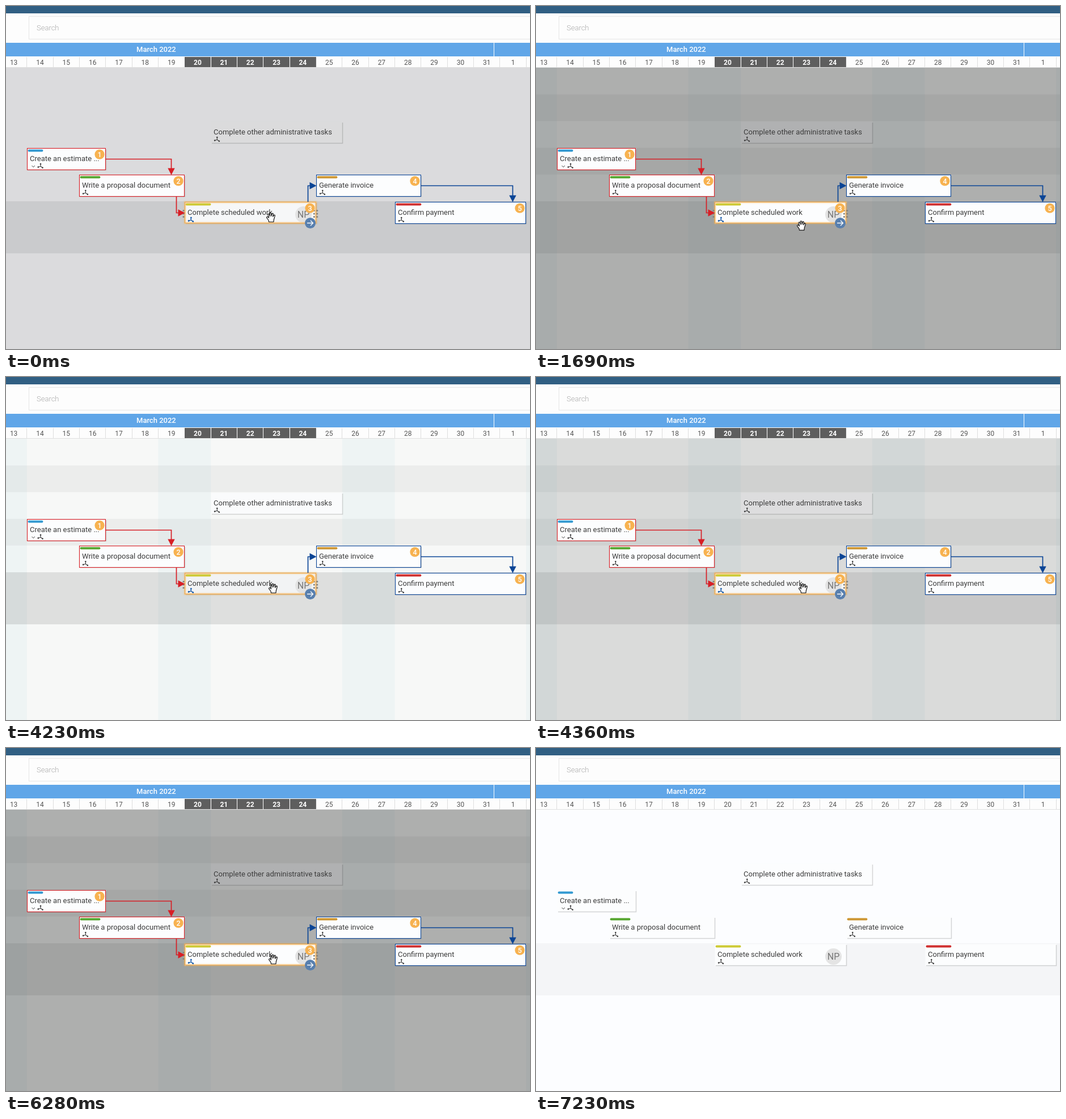
An HTML page for the animation above (7.73 s loop, 924 by 606 pixels).

```html
<!DOCTYPE html>
<html lang="en">
<head>
<meta charset="utf-8">
<style>
  html, body { margin: 0; width: 100%; height: 100%; overflow: hidden; background: #fcfdff; }
  svg { display: block; width: 924px; height: 606px; font: 13px Roboto, sans-serif; }
</style>
</head>
<body>
<svg id="stage" viewBox="0 0 924 606"></svg>
<script>
const LOOP = 7730, DAY = 46.34, ROW = 47.2;
const RED = '#d71f26', BLUE = '#0b4596', ORANGE = '#f7b250', INK = '#3c3c3c';
const dayX = i => 36.8 + DAY * i;

const rect = (x, y, w, h, fill, extra = '') =>
  `<rect x="${x}" y="${y}" width="${w}" height="${h}" fill="${fill}" ${extra}/>`;
const line = (d, color, width = 1, extra = '') =>
  `<path d="${d}" fill="none" stroke="${color}" stroke-width="${width}" ${extra}/>`;
const text = (x, y, str, fill, extra = '') => `<text x="${x}" y="${y}" fill="${fill}" ${extra}>${str}</text>`;
const circle = (x, y, r, fill) => `<circle cx="${x}" cy="${y}" r="${r}" fill="${fill}"/>`;
const group = (id, content) => `<g id="${id}">${content}</g>`;

// Cards are placed by first day, length in days and row.
function card(day, length, row, label, color, edge) {
  const x = Math.round(dayX(day)), right = Math.round(dayX(day + length)), y = Math.round(204 + ROW * row);
  return { x, right, y, w: right - x, mid: y + 19.5, bar: color ? 9 * length - 1 : 0, label, color, edge };
}
const other = card(7, 5, 0, 'Complete other administrative tasks');
const cards = [
  card(0, 3, 1, 'Create an estimate ...', '#3399d1', RED),
  card(2, 4, 2, 'Write a proposal document', '#55a52e', RED),
  card(6, 5, 3, 'Complete scheduled work', '#cdca35'),
  card(11, 4, 2, 'Generate invoice', '#cd9632', BLUE),
  card(14, 5, 3, 'Confirm payment', '#d03030', BLUE)
];
const [estimate, proposal, active, invoice, payment] = cards;

const outline = (c, color, width, extra) =>
  rect(c.x + .5, c.y + .5, c.w - 1, c === active ? 37 : 38, 'none', `stroke="${color}" stroke-width="${width}" ${extra}`);

const cardBody = c => rect(c.x + .5, c.y + .5, c.w, 38, '#fcfdfe') +
  line(`M${c.x + 2} ${c.y + 38.5}H${c.right + .5}V${c.y + 2}`, '#000', 1.5, 'opacity=".16"');

function nodeIcon(x, y, color) {
  const tips = [0, 1, 2].map(i => [x + 4.4 * Math.sin(i * 2.2), y - 4.2 * Math.cos(i * 2.2)]);
  return tips.map(([tx, ty]) => line(`M${x} ${y}L${tx} ${ty}`, color, 1.1) + circle(tx, ty, 1.3, color)).join('');
}

function cardLabel(c) {
  const collapsed = c === estimate;
  return (c.bar ? line(`M${c.x + 3.5} ${c.y + 4.5}h${c.bar - 3}`, c.color, 3.8, 'stroke-linecap="round"') : '') +
    text(c.x + 5, c.y + 23, c.label, INK) + nodeIcon(c.x + (collapsed ? 24 : 11.3), c.y + 32.3, INK) +
    (collapsed ? line(`M${c.x + 8.5} ${c.y + 31}l2.7 2.7 2.7-2.7`, INK) : '');
}

function days(from, to, dark) {
  let out = '';
  for (let i = from; i <= to; i++) {
    const x = Math.floor(dayX(i)) + .5;
    if (dark) out += rect(x, 90, DAY, 18, '#5e5e5e');
    out += line(`M${x} 90V108`, dark ? '#fff' : '#dedede') +
      text(dayX(i) + DAY / 2, 104, i < 18 ? i + 14 : 1, dark ? '#fff' : '#555',
        `text-anchor="middle" font-size="12" ${dark ? 'font-weight="700"' : ''}`);
  }
  return out;
}

const header =
  rect(0, 0, 924, 109, '#fdfdfd') + rect(0, 0, 924, 13, '#315f83') +
  rect(40.5, 18.5, 900, 40, '#fdfdfd', 'stroke="#e6e6e6"') +
  text(54, 43, 'Search', '#a9a9a9', 'font-weight="300"') +
  rect(0, 65, 924, 24, '#60a6e8') + line('M860.5 65V89', '#fff') +
  text(230, 81, 'March 2022', '#fff', 'font-weight="500"') +
  days(-1, 19) + line('M0 108.5H924', '#e0e0e0');

const stripes = rect(0, 109, 924, 497, '#f9f8f6', 'opacity=".6"') +
  [1, 3].map(i => rect(0, 109 + ROW * i, 924, ROW, '#000', 'opacity=".042"')).join('') +
  [-2, 5, 12, 19].map(i => rect(dayX(i), 109, 2 * DAY, 497, '#9fcdd8', 'opacity=".1"')).join('');

const down = (x, y) => `M${x - 6.2} ${y - 12}h12.4L${x} ${y}z`;
const ahead = (x, y) => `M${x - 12} ${y - 6.2}v12.4L${x} ${y}z`;
const arrow = (path, head, color) => line(path, color, 1.7) + `<path d="${head}" fill="${color}"/>`;

// From a card's side down onto the next card's top.
function linkOver(a, b, color) {
  const x = b.right - 23.5;
  return arrow(`M${a.right} ${a.mid}H${x}V${b.y - 10}`, down(x, b.y + .5), color);
}
// From a card's top or bottom into the next card's left side.
function linkInto(a, b, color) {
  const x = a.right - 14.5;
  return arrow(`M${x} ${b.y > a.y ? a.y + 39 : a.y}V${b.mid}H${b.x - 10}`, ahead(b.x + .5, b.mid), color);
}

const badge = (c, i) => circle(c.right - 11, c.y + 11.2, 8.6, ORANGE) +
  text(c.right - 11, c.y + 15.7, i + 1, '#fff', 'text-anchor="middle" font-size="12.5" font-weight="500"');

const chained = cards.filter(c => c.edge);
const links = chained.map(c => outline(c, c.edge, 1.1)).join('') +
  linkOver(estimate, proposal, RED) + linkInto(proposal, active, RED) +
  linkInto(active, invoice, BLUE) + linkOver(invoice, payment, BLUE) +
  cards.map(badge).join('') +
  circle(536.5, 383.5, 9.5, '#587fae') + line('M531 383.5h10.5m-4.5-4.5l4.5 4.5-4.5 4.5', '#fff', 1.3);

const dots = x => [-5.5, 0, 5.5].map(dy => circle(x, active.mid + 1.5 + dy, 1.6, '#85827c')).join('');
const hover = outline(active, ORANGE, 3.5, 'opacity=".4" filter="url(#soft)"') + outline(active, '#f0ab52', 1.4) +
  nodeIcon(active.x + 11.3, active.y + 32.3, '#1a66c0') + dots(313) + dots(543.3) + dots(548.7);

const glow = chained.map(c => outline(c, c.edge, 5, 'opacity=".4" filter="url(#soft)"')).join('');

const hand = `<path d="M-3.5 8.5L-4 5.5-7.3 1.2C-8-.3-6-1.3-4.8-.1L-3.4 1.2-5-4C-5.3-5.8-3.2-6.3-2.6-4.6L-1.6-1.6-1.8-6.6C-1.7-8.2.5-8.2.6-6.6L1-1.8 2.1-5.9C2.6-7.4 4.5-6.9 4.3-5.3L3.7-.9 5.4-3.4C6.3-4.5 7.8-3.6 7.2-2.1L5.3 4.5 4.8 8.5Z"
  fill="#fff" stroke="#111" stroke-width="1.2" stroke-linejoin="round"/>`;

document.getElementById('stage').innerHTML =
  '<defs><filter id="soft" x="-10%" y="-30%" width="120%" height="160%"><feGaussianBlur stdDeviation="1.2"/></filter></defs>' +
  rect(0, 0, 924, 606, '#fcfdff') + group('stripes', stripes) +
  rect(0, 345, 924, 92, '#000', 'id="row"') +
  cardBody(other) + rect(0, 109, 924, 497, '#000', 'id="dim"') + cardLabel(other) +
  group('glow', glow) + cards.map(cardBody).join('') +
  rect(active.x + .5, active.y + .5, active.w, 38, '#000', 'id="tint"') +
  cards.map(cardLabel).join('') +
  circle(524.5, 368.5, 14.5, '#e4e4e4') + text(524.5, 374, 'NP', '#757575', 'text-anchor="middle" font-size="16"') +
  group('hover', hover) + group('links', links) +
  header + group('darkDays', days(6, 10, true)) + group('cursor', hand);

const visits = [{ enter: -1170, leave: 1700 }, { enter: 3200, leave: 6410 }];
const ramp = (t, start, duration) => Math.min(1, Math.max(0, (t - start) / duration));
const easeOut = p => p * (2 - p);

// How far an effect is shown: it fades in some time after the pointer enters and out when it leaves.
const shown = (t, delay, duration) => Math.max(...visits.map(v =>
  ramp(t, v.enter + delay, duration) * (1 - ramp(t, v.leave, 320))));
const pulse = t => Math.max(...visits.map(v => Math.sin(Math.PI * ramp(t, v.enter + 1290, 700))));

const byId = id => document.getElementById(id);

function draw() {
  const t = performance.now() % LOOP;
  const hovered = shown(t, 0, 60), linked = shown(t, 360, 200), dimmed = shown(t, 1020, 340);
  const banded = linked * ramp(t, 0, 150);
  const opacities = {
    hover: hovered, darkDays: hovered, links: linked, stripes: banded, glow: pulse(t),
    dim: .3 * dimmed,
    tint: .04 * hovered * (1 - dimmed),
    row: .09 + .013 * banded - .038 * dimmed - .06 * ramp(t, 6760, 300)
  };
  for (const id in opacities) byId(id).setAttribute('opacity', opacities[id]);

  const away = easeOut(ramp(t, 1570, 810)) - easeOut(ramp(t, 2750, 700));
  const exit = ramp(t, 6280, 750);
  const x = 467 + 4 * ramp(t, 1570, 500) + 9 * exit;
  byId('cursor').setAttribute('transform', `translate(${x} ${373 + 53 * away + 250 * exit ** 1.5})`);
  requestAnimationFrame(draw);
}
draw();
</script>
</body>
</html>
```
